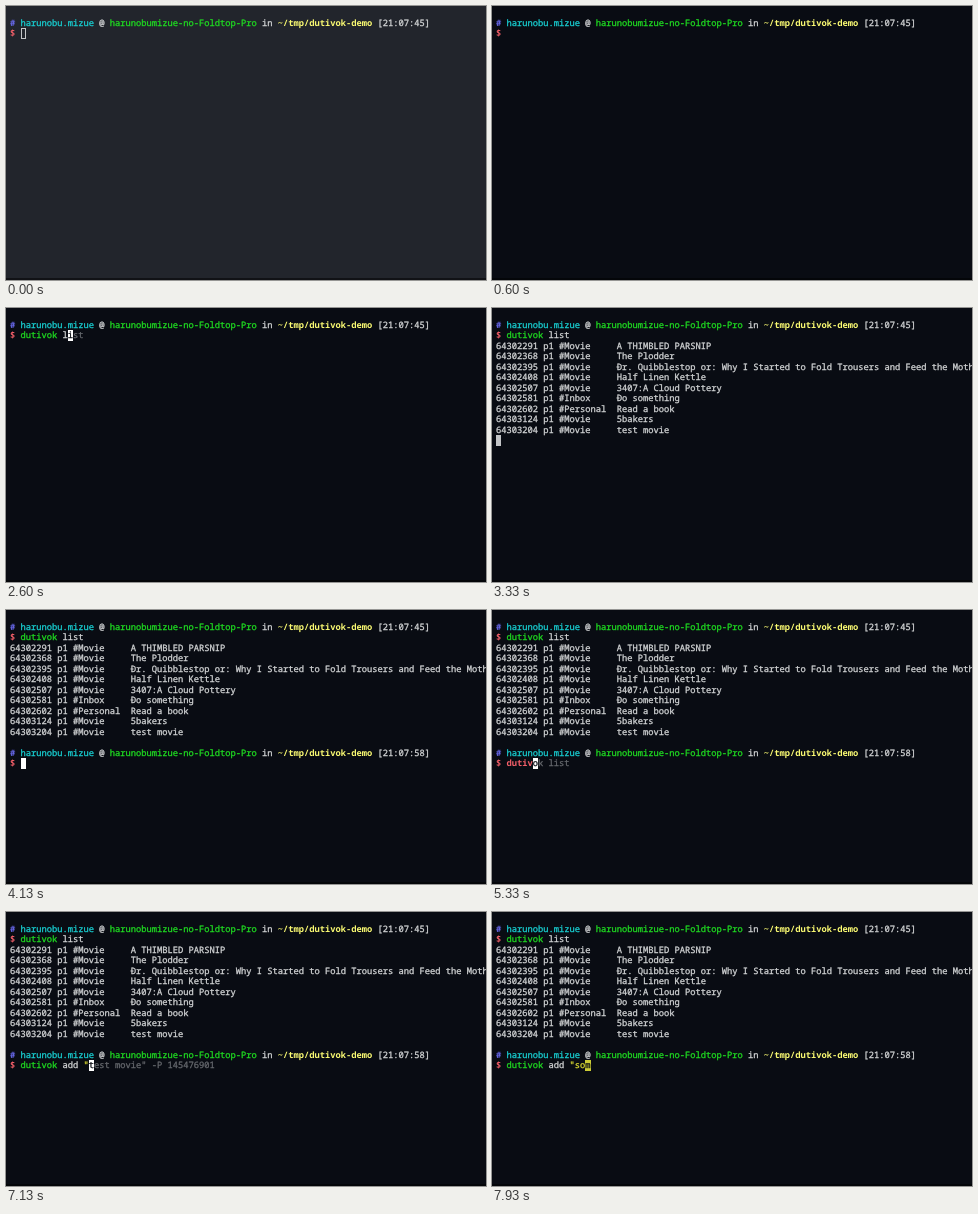
These frames come from a looping animation (480x274 px, 8000 ms). An HTML page:

```html
<!DOCTYPE html>
<html lang="en">
<head>
<meta charset="utf-8">
<title>Terminal session</title>
<style>
  html, body { margin: 0; width: 100%; height: 100%; overflow: hidden; }
  body { position: relative; background: #090c13; color: #d3d5d6; }
  body.unfocused { background: #22252c; }
  body::after { content: ""; position: absolute; left: 0; right: 0; top: 272px; height: 2px; background: #000; opacity: .5; }
  pre {
    position: absolute; left: 4px; top: 11.5px; margin: 0;
    font: 500 8.75px/10.5px "Noto Sans Mono", "DejaVu Sans Mono", monospace;
    text-rendering: geometricPrecision;
    -webkit-text-stroke: .3px currentColor;
  }
  .hash { color: #6b6bf2; font-weight: 700; }
  .user { color: #18cfd2; }
  .host, .ok { color: #1fdc21; }
  .path { color: #fafa72; font-weight: 700; }
  .dollar, .bad { color: #f5606a; font-weight: 700; }
  .path, .hash, .dollar, .bad { -webkit-text-stroke-width: 0; }
  .quote { color: #dada30; }
  .hint { color: #65686d; }
  .cursor { display: inline-block; width: 5.25px; height: 10.5px; background: #fff; color: #090c13; }
  .busy { background: #c3c5c7; }
  .landing { background: #cbcb35; }
  .unfocused .cursor { background: none; box-shadow: inset 0 0 0 1px #c4c6c8; }
</style>
</head>
<body>
<pre id="screen"></pre>
<script>
const LOOP = 8000, FOCUS = 600, CURSOR_ON = 1000;
const ENTER = 3200, OUTPUT = 3270, PROMPT = 3700, LANDING = 7900;
const APP = "dutivok";

// Keystroke bursts: start time, ms per key, text
const LIST_KEYS = [[1700, 110, APP + " list"]];
const ADD_KEYS = [[4930, 95, APP], [5800, 150, " add"], [6700, 200, ' "'], [7560, 140, "so"]];
const HISTORY = [APP + " list", APP + ' add "test movie" -P 145476901'];

const TASKS = [
  ["64302291", "Movie", "A THIMBLED PARSNIP"],
  ["64302368", "Movie", "The Plodder"],
  ["64302395", "Movie", "Ðr. Quibblestop or: Why I Started to Fold Trousers and Feed the Moth"],
  ["64302408", "Movie", "Half Linen Kettle"],
  ["64302507", "Movie", "3407:A Cloud Pottery"],
  ["64302581", "Inbox", "Ðo something"],
  ["64302602", "Personal", "Read a book"],
  ["64303124", "Movie", "5bakers"],
  ["64303204", "Movie", "test movie"],
].map(([id, project, title]) => `${id} p1 ${("#" + project).padEnd(11)}${title}`);

const span = (kind, text) => `<span class="${kind}">${text}</span>`;
const cursor = (char = " ", kind = "") => span("cursor " + kind, char);

const prompt = time => span("hash", "#") + " " + span("user", "harunobu.mizue") + " @ " +
  span("host", "harunobumizue-no-Foldtop-Pro") + " in " +
  span("path", `~/tmp/${APP}-demo`) + ` [${time}]`;

function typedAt(bursts, t) {
  return bursts.map(([start, step, text]) =>
    text.slice(0, Math.max(0, Math.floor((t - start) / step) + 1))).join("");
}

function highlight(text) {
  const [, command, rest, quoted] = text.match(/^(\S*)([^"]*)(.*)$/);
  return span(command === APP ? "ok" : "bad", command) + rest + span("quote", quoted);
}

function commandLine(text, tail = "") {
  return span("dollar", "$") + " " + highlight(text) + tail;
}

function editing(text, t) {
  if (t >= LANDING) return commandLine(text, cursor("m", "landing"));
  const match = text && HISTORY.find(entry => entry.startsWith(text));
  const hint = match ? match.slice(text.length) : "";
  const visible = t < FOCUS || t >= CURSOR_ON;
  return commandLine(text, visible ? cursor(hint[0]) + span("hint", hint.slice(1)) : "");
}

function linesAt(t) {
  const lines = [prompt("21:07:45")];
  if (t < ENTER) return [...lines, editing(typedAt(LIST_KEYS, t), t)];
  lines.push(commandLine(APP + " list"));
  if (t >= OUTPUT) lines.push(...TASKS);
  if (t < PROMPT) return [...lines, cursor(" ", "busy")];
  return [...lines, "", prompt("21:07:58"), editing(typedAt(ADD_KEYS, t), t)];
}

const screenEl = document.getElementById("screen");
let shown = "";

function render(now) {
  const t = now % LOOP;
  const html = linesAt(t).join("\n");
  document.body.classList.toggle("unfocused", t < FOCUS);
  if (html !== shown) screenEl.innerHTML = shown = html;
  requestAnimationFrame(render);
}
render(performance.now());
</script>
</body>
</html>
```
